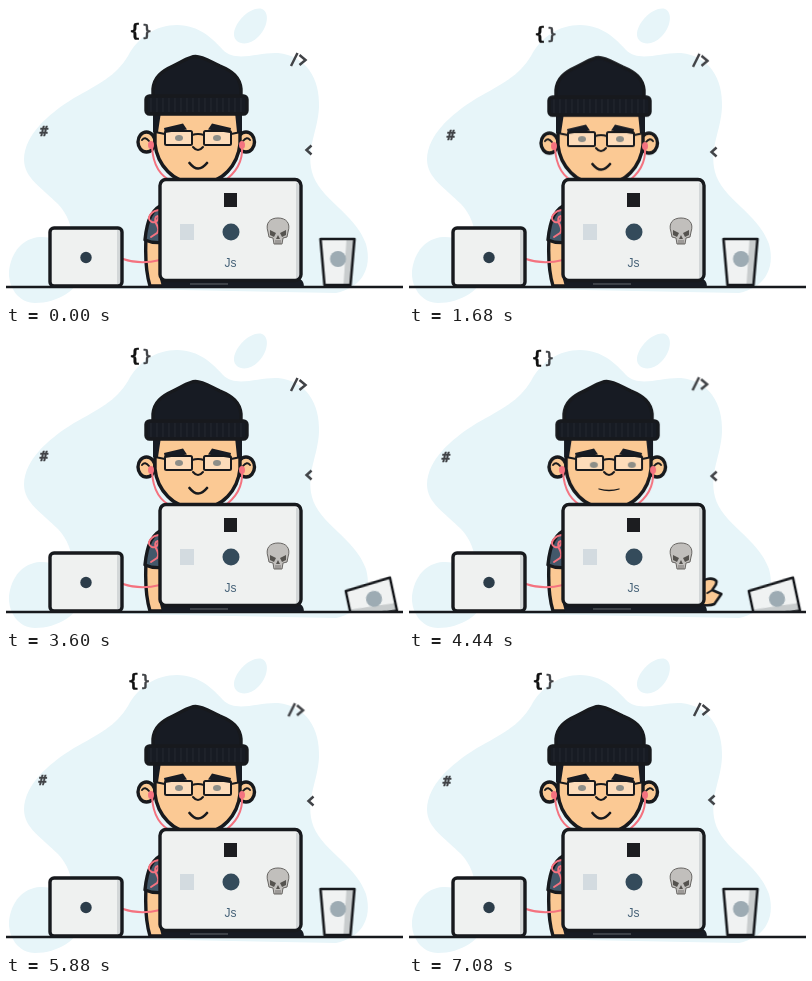
An HTML page that plays this animation: 397x297 px, repeating every 7120 ms.

```html
<!DOCTYPE html>
<html lang="en">
<head>
<meta charset="utf-8">
<title>Coder at a desk</title>
<style>
  html, body { margin: 0; width: 100%; height: 100%; overflow: hidden; background: #fff; }
  svg { display: block; width: 397px; height: 297px; }

  .ink { stroke: #17191d; stroke-width: 3.4; stroke-linejoin: round; stroke-linecap: round; }
  .thin { stroke-width: 2; }
  .mid { stroke-width: 2.6; }
  .line { fill: none; }
  .skin { fill: #fbc994; }
  .metal { fill: #eff1f0; }
  .dark { fill: #171b23; }
  .wire { fill: none; stroke: #f4727f; stroke-width: 2; stroke-linecap: round; }
  .bg { fill: #e7f5f9; }
  .code { font: bold 15px "DejaVu Sans Mono", monospace; fill: #414347; stroke: #414347; stroke-width: .4; text-anchor: middle; }
  .code path { fill: none; stroke-width: 2.5; }
  .code .open { font-size: 18px; fill: #111; stroke: #111; }
  .code .small { font-size: 14px; }

  /* floating code marks */
  .code g { animation: 3.56s ease-in-out infinite; }
  .code .hash { animation-name: hash; }
  .code .brace { animation-name: brace; }
  .code .tag { animation-name: tag; }
  .code .less { animation-name: less; }
  @keyframes hash {
    25% { transform: translate(-1px, 1px); }
    48% { transform: translate(4px, 4px); }
    76% { transform: translate(-3.5px, -3px); }
  }
  @keyframes brace {
    20% { transform: translate(-1px, 2px); }
    39% { transform: translate(.5px, 4.5px); }
    48% { transform: translate(2px, 3px); }
    65% { transform: translate(-1.5px, 0); }
    76% { transform: translate(0, 1.5px); }
  }
  @keyframes tag {
    39% { transform: translate(-2px, -1px); }
    48% { transform: translate(-1px, .8px); }
    65% { transform: translate(-2.5px, .3px); }
    76% { transform: translate(-4px, -2px); }
  }
  @keyframes less {
    39% { transform: translate(3px, 1.5px); }
    48% { transform: translate(2px, 2px); }
    65% { transform: translate(2px, 1px); }
    76% { transform: translate(4px, -1px); }
  }

  /* the cup tips over, is picked up and put back */
  .head, .eyes, .cup, .arm { animation: 7.12s ease-in-out infinite; }
  .cup { animation-name: cup; }
  .arm { animation-name: arm; }
  .head { animation-name: head; }
  .eyes { animation-name: eyes; }
  .smile, .flat { animation: smile 7.12s step-end infinite; }
  .flat { animation-name: flat; }
  @keyframes cup {
    0%, 32.3%, 75.1%, 100% { transform: translate(331.5px, 256px) rotate(0deg); }
    32.3% { animation-timing-function: ease-in; }
    36.5% { transform: translate(362px, 266px) rotate(82deg); }
    38.2% { transform: translate(364px, 261.5px) rotate(80deg); }
    41.4%, 64.6% { transform: translate(365px, 268px) rotate(78deg); }
    69.7% { transform: translate(354.5px, 254px) rotate(48deg); }
  }
  @keyframes arm {
    0%, 60%, 80.5%, 100% { transform: translate(-78px, 4px); }
    64.6% { transform: translate(8px, 6px); }
    69.7% { transform: translate(0, 0); }
    75.1% { transform: translate(-18px, 0); }
  }
  @keyframes head {
    0%, 50%, 58.3%, 80.8%, 100% { transform: translate(0, 0); }
    38.2% { transform: translate(0, 1.6px); }
    63.2%, 75.8% { transform: translate(8.5px, 0); }
  }
  @keyframes eyes {
    0%, 58.3%, 80.8%, 100% { transform: translate(0, 0); }
    63.2%, 75.8% { transform: translate(4px, 2px); }
  }
  @keyframes smile { 0%, 78.3% { opacity: 1; } 60.7% { opacity: 0; } }
  @keyframes flat { 0%, 78.3% { opacity: 0; } 60.7% { opacity: 1; } }
</style>
</head>
<body>
<svg viewBox="0 0 397 297">
  <defs>
    <clipPath id="above"><path d="M0 0H397V281H0Z"/></clipPath>
    <clipPath id="lenses"><path d="M159 125H186V139H159ZM198 125H225V139H198Z"/></clipPath>
    <pattern id="ribs" width="6" height="22" patternUnits="userSpaceOnUse">
      <path d="M1 0V22" stroke="#23272f"/>
    </pattern>
  </defs>

  <g class="bg">
    <path d="M18 153C19 130 39 110 68 92C93 78 110 70 122 50C132 31 150 19 171 19C194 20 205 31 217 44C230 57 252 46 272 47C300 50 314 72 313 101C312 125 300 142 306 166C313 193 349 207 360 238C367 264 354 282 330 287L70 282C65 240 72 220 52 198C35 181 18 172 18 153Z"/>
    <path d="M3 265C5 246 17 232 34 231C56 230 75 245 75 264C75 284 51 297 29 297C13 297 2 282 3 265Z"/>
    <path d="M256 3C264 6 262 22 252 31C243 41 227 39 228 27C230 14 246 0 256 3Z"/>
  </g>

  <g class="code">
    <g class="brace">
      <text class="open" x="129" y="31">{</text>
      <text x="141" y="30">}</text>
    </g>
    <g class="hash"><text class="small" x="38" y="130">#</text></g>
    <g class="tag"><path d="M285 60L291.500 47M293.500 49L299.500 54L293.500 59"/></g>
    <g class="less"><path d="M305.500 139.500L300.500 144L305.500 148.500"/></g>
  </g>

  <!-- near arm and shoulder -->
  <path class="ink skin" d="M140 232C139 252 140 267 144 280H160V230Z"/>
  <path class="ink" fill="#43586a" d="M160 197C146 202 141 213 139 234Q148 238 160 236Z"/>
  <path class="wire" d="M155 204C145 204 139 213 146 216C153 218 154 207 150 211C146 217 156 221 151 227L145 231"/>

  <g class="head">
    <g class="ink skin">
      <ellipse cx="140.500" cy="136" rx="8.500" ry="10"/>
      <ellipse cx="240" cy="136" rx="8.500" ry="10"/>
      <path d="M149 104V138C151 158 167 178 192 178C217 178 232 158 234 138V104Z"/>
    </g>
    <path class="ink thin line" d="M136 134Q139 130 143 135M244 134Q241 130 237 135"/>
    <path class="dark" d="M147 106H155L152 126H147ZM236 106H229L231 126H236Z"/>

    <path class="ink dark" d="M147 92V83C148 71 156 65 167 60C176 56 183 50.500 189.500 50.500C197 50.500 205 56 214 60C226 65 234 71 235 83V92Z"/>
    <rect class="ink dark" x="140" y="90" width="101" height="18" rx="3.500"/>
    <rect x="142" y="92" width="97" height="14" fill="url(#ribs)"/>

    <path fill="#fff" fill-opacity=".35" d="M159 125H186V139H159ZM198 125H225V139H198Z"/>
    <g clip-path="url(#lenses)">
      <g class="eyes" fill="#8d8e88">
        <ellipse cx="173" cy="132" rx="4" ry="3"/>
        <ellipse cx="211" cy="132" rx="4" ry="3"/>
      </g>
    </g>
    <path class="dark" d="M158 122L177 117.500L181 123.500L159 127ZM225 122L206 117.500L202 123.500L224 127Z"/>
    <g class="ink thin line">
      <rect x="159" y="125" width="27" height="14" rx="1.500"/>
      <rect x="198" y="125" width="27" height="14" rx="1.500"/>
      <path d="M186 129Q192 127 198 129M159 128L149 126M225 128L235 126"/>
      <path d="M187 141Q192 147 197 141"/>
      <path class="smile mid" d="M183.500 157Q192 168 201 157"/>
      <path class="flat" style="stroke-width:1.3" d="M182 158Q192 161 202 158"/>
    </g>

    <path class="wire" d="M146 141C147 158 153 170 167 176M236 141C237 156 230 167 217 176"/>
    <g fill="#f4727f">
      <ellipse cx="145" cy="139" rx="3" ry="4"/>
      <ellipse cx="236" cy="139" rx="3" ry="4"/>
    </g>
  </g>

  <g clip-path="url(#above)">
    <g class="arm">
      <path class="ink skin mid" d="M250 276L295 260Q312 255 322 248C328 242 337 241 340 245C341 249 337 251 336 254L345 258L338 268C332 271 326 268 321 269Q308 273 295 276L250 292Z"/>
      <path class="ink thin line" d="M336 254L331 257"/>
    </g>
    <g class="cup">
      <path fill="#f0f2f2" d="M-17-23H17L13 23H-13Z"/>
      <path fill="#c8cccd" d="M9-23H17L13 23H6Z"/>
      <circle cx=".5" cy="-3" r="8" fill="#9dabb3"/>
      <path class="ink line mid" d="M-17-23H17L13 23H-13Z"/>
    </g>
  </g>

  <path class="wire" d="M117 253Q134 259 154 254"/>
  <path d="M0 281H397" stroke="#17191d" stroke-width="2.600"/>

  <!-- tablet -->
  <rect class="metal" x="44" y="222" width="72" height="58" rx="4"/>
  <path fill="#d3d7d8" d="M111 224H115V278H111Z"/>
  <rect class="ink line" x="44" y="222" width="72" height="58" rx="4"/>
  <circle cx="80" cy="251.500" r="5.700" fill="#2c3d4a"/>

  <!-- laptop -->
  <path class="dark" d="M154 273H294Q298 275 298 281H156Z"/>
  <path d="M184 278H222" stroke="#65696d"/>
  <rect class="metal" x="154" y="173.500" width="141" height="101" rx="6"/>
  <path fill="#d3d7d8" d="M290 177H293V273H290Z"/>
  <rect class="ink line" x="154" y="173.500" width="141" height="101" rx="6"/>

  <rect x="218" y="187" width="13" height="14" fill="#1c1d20"/>
  <rect x="174" y="218" width="14" height="16" fill="#d3dbe0"/>
  <circle cx="225" cy="226" r="8.500" fill="#344b5b"/>
  <text x="224.500" y="261" text-anchor="middle" fill="#466278" style="font:12px 'Liberation Sans',sans-serif">Js</text>

  <!-- skull sticker -->
  <path fill="#c1bfbc" stroke="#686663" d="M262 226C259 217 264 212 272 212C280 212 285 217 282 226L281 231L277 232L276 238H268L267 232L263 231Z"/>
  <path fill="#55534f" d="M264 224L270 227L268 231L264 229ZM280 224L274 227L276 231L280 229ZM272 229L274 233H270Z"/>
  <path stroke="#686663" stroke-width=".8" d="M270 234V238M272 234V238M274 234V238"/>
</svg>
</body>
</html>
```
